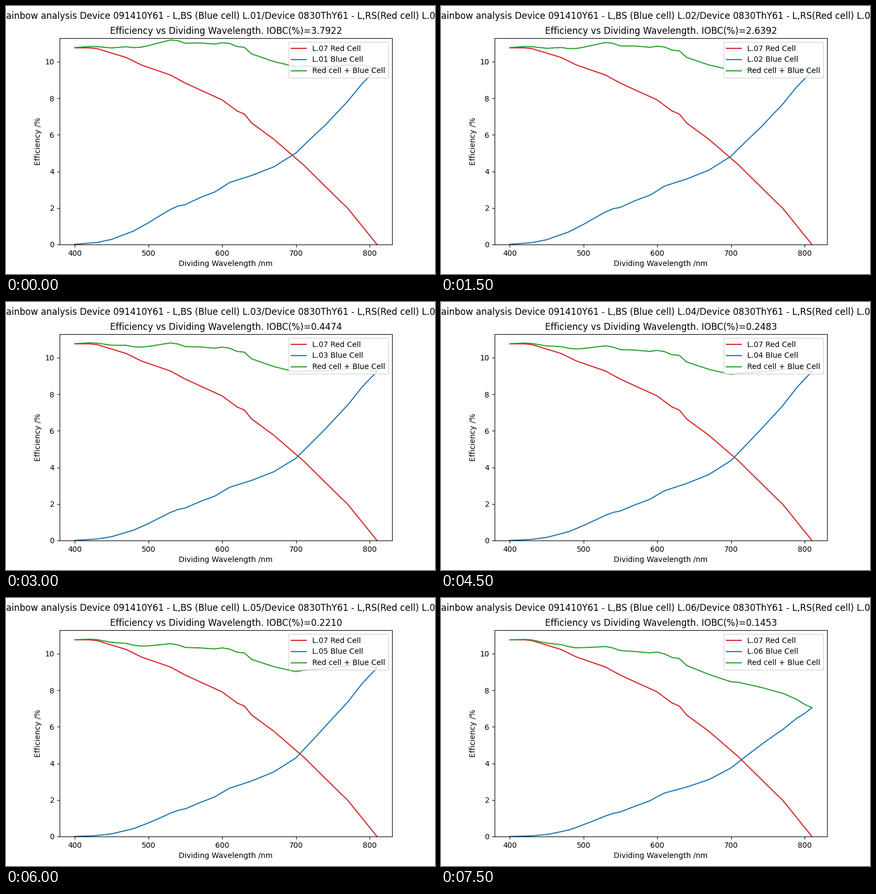
Recreate the animation shown at these times as a matplotlib script. Size 800 by 500 pixels, loop 8000 ms.

```python
import numpy as np
import matplotlib.pyplot as plt
from matplotlib.animation import FuncAnimation

STEP_MS = 500
FRAMES = 16
HOLD = 3  # frames spent on each blue cell

wavelength = np.arange(400, 811, 10)


def through(*points):
    """Curve through a few (wavelength, value) key points."""
    return np.interp(wavelength, *zip(*points))


red = through(
    (400, 10.76), (420, 10.76), (430, 10.72), (470, 10.23), (490, 9.83),
    (530, 9.27), (550, 8.83), (600, 7.91), (620, 7.31), (630, 7.14),
    (640, 6.65), (670, 5.76), (710, 4.37), (760, 2.38), (770, 2.0), (810, 0))

# Cell L.03; the other blue cells are scaled from it
blue_base = through(
    (400, 0.01), (430, 0.08), (450, 0.21), (480, 0.57), (500, 0.93),
    (530, 1.54), (540, 1.70), (550, 1.78), (570, 2.13), (590, 2.43),
    (610, 2.91), (640, 3.29), (670, 3.76), (700, 4.50), (740, 6.11),
    (770, 7.40), (790, 8.41), (810, 9.25))

scale_at = (400, 500, 600, 700, 740, 800)

# (IOBC, scale of the blue curve at the wavelengths above)
cells = [
    (3.7922, (1.38, 1.28, 1.172, 1.112, 1.07, 1.043)),
    (2.6392, (1.30, 1.183, 1.101, 1.073, 1.046, 1.026)),
    (0.4474, (1, 1, 1, 1, 1, 1)),
    (0.2483, (0.74, 0.882, 0.933, 0.971, 0.99, 1.0)),
    (0.2210, (0.62, 0.80, 0.903, 0.956, 0.988, 0.997)),
    (0.1453, (0.36, 0.695, 0.816, 0.833, 0.817, 0.762)),
]

fig, ax = plt.subplots(figsize=(8, 5), dpi=100)
ax.plot(wavelength, red, color="tab:red", label="L.07 Red Cell")
blue_line, = ax.plot(wavelength, blue_base, color="tab:blue",
                     label="L.01 Blue Cell")
sum_line, = ax.plot(wavelength, red + blue_base, color="tab:green",
                    label="Red cell + Blue Cell")
ax.set_ylim(0, 11.29)
ax.set_xlabel("Dividing Wavelength /nm")
ax.set_ylabel("Efficiency /%")
legend = ax.legend(loc="upper right")
heading = fig.suptitle("")


def update(frame):
    index = frame // HOLD
    name = f"L.0{index + 1}"
    iobc, scale = cells[index]
    blue = blue_base * through(*zip(scale_at, scale))
    blue_line.set_ydata(blue)
    sum_line.set_ydata(red + blue)
    legend.get_texts()[1].set_text(f"{name} Blue Cell")
    heading.set_text(
        f"Rainbow analysis Device 091410Y61 - L,BS (Blue cell) {name}"
        "/Device 0830ThY61 - L,RS(Red cell) L.07")
    ax.set_title(f"Efficiency vs Dividing Wavelength. IOBC(%)={iobc:.4f}")
    return blue_line, sum_line


anim = FuncAnimation(fig, update, frames=FRAMES, interval=STEP_MS,
                     init_func=lambda: update(0), repeat=True)
plt.show()
```
